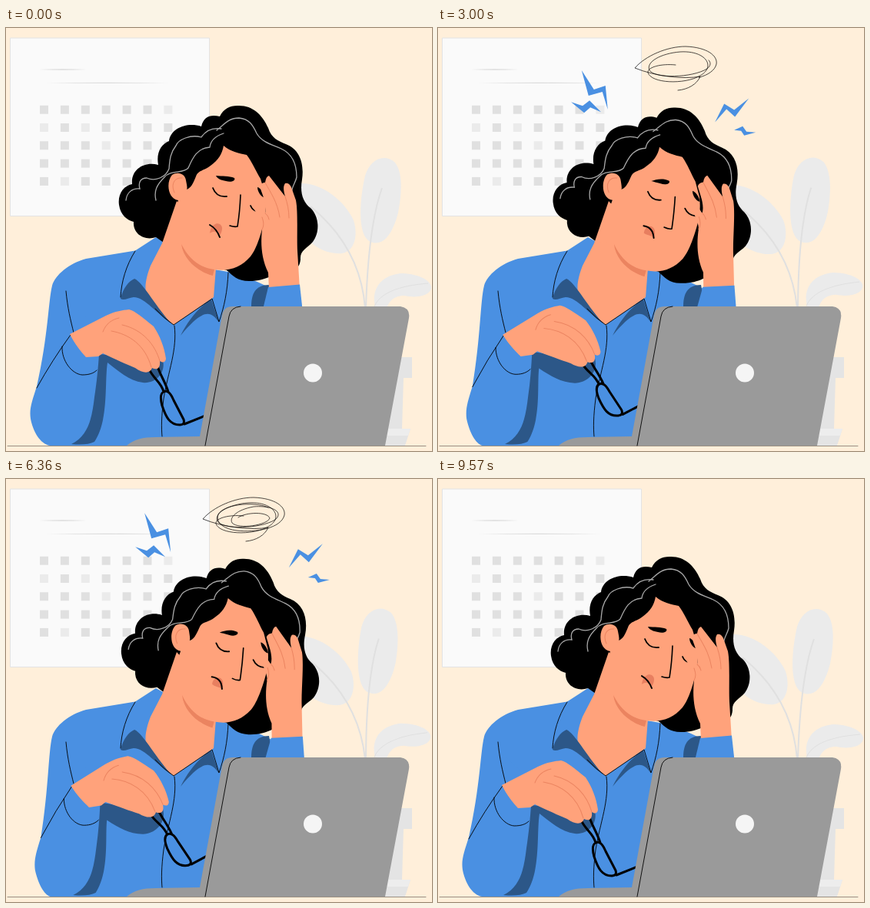
These frames come from a looping animation (554x550 px, 9.64 s). An HTML page:

```html
<!DOCTYPE html>
<html lang="en">
<head>
<meta charset="utf-8">
<title>Tired at the laptop</title>
<style>
  html, body { margin: 0; width: 100%; height: 100%; overflow: hidden; background: #ffefda; }
  svg { display: block; width: 554px; height: 550px; }
  .line { fill: none; stroke: #000; stroke-linecap: round; stroke-linejoin: round; }
  .thin { stroke-width: .9; }
  .blue { fill: #4a90e2; }
  .navy { fill: #2c5788; }
  .skin { fill: #ffa27b; }
  .crease { fill: none; stroke: #eb8460; stroke-width: 1; stroke-linecap: round; }
  .strand { fill: none; stroke: #a8a8a8; stroke-width: 1.3; stroke-linecap: round; }
  .leaf { fill: #ebebeb; }
  .stem { fill: none; stroke: #e0e0e0; stroke-width: 2; }
</style>
</head>
<body>
<svg viewBox="0 0 554 550">
  <g id="calendar">
    <path d="M5.500 13H264.500V244.500H5.500Z" fill="#fafafa" stroke="#e3e3e3"/>
    <path d="M43 54Q74 52.500 105 54Q74 55.500 43 54ZM52 71.300Q132 70 212 71.300Q132 72.600 52 71.300Z" fill="#dcdcdc"/>
  </g>

  <g id="plant">
    <path class="leaf" d="M383 202C410 201 440 224 452 250C458 268 454 290 437 293C415 295 385 280 383 250Z"/>
    <path class="leaf" d="M474 278C456 270 460 222 467 192C473 171 492 162 506 175C516 188 515 214 510 240C503 268 490 285 474 278Z"/>
    <path class="leaf" d="M480 362C475 340 487 321 515 319C540 320 554 330 553 338C551 350 530 351 518 348C505 348 499 354 495 364Z"/>
    <path class="stem" d="M467 364C463 312 440 268 396 232M468 364C470 300 476 244 489 208"/>
    <path class="stem" style="stroke-width:1" d="M479 362C486 345 510 335 549 332"/>
  </g>
  <path d="M508 428H528V455H517L515 521H526L519 543H490Z" fill="#e4e4e4"/>
  <path d="M497 521H526L523 530H495Z" fill="#ededed"/>

  <g id="bolts" class="blue">
    <path d="M180 44L196 69L211 64L214 95L207 72L189 77Z"/>
    <path d="M168 88L183 93L192 86L207 101L193 95L185 102Z"/>
    <path d="M412 84L394 108L383 98L368 115L380 91L393 99Z"/>
    <path d="M393 128L404 123L409 130L421 131L406 135L402 129Z"/>
  </g>
  <g id="scribble" class="line" stroke-width=".7">
    <path pathLength="1" d="M312 81C325 80 337 73 341 63C320 67 283 63 256 52C270 36 298 24 322 24C350 25 364 36 362 47C358 64 325 70 300 67C285 65 272 58 276 46C282 34 320 28 341 37"/>
    <path pathLength="1" d="M309 48C290 46 272 51 273 58C277 72 320 74 341 62C362 50 348 29 315 31C290 33 270 44 275 55C282 66 330 65 350 53C362 43 346 34 322 36C300 40 290 50 294 57C302 66 340 60 343 51C340 42 312 43 302 50"/>
  </g>

  <path class="blue" d="M60 335C64 321 82 306 104 300L168 289.500L195 272L271 314L289 317C305 322 325 328 341 337L360 345V543H62Z"/>
  <path class="blue" id="sleeve"/>
  <g class="head">
    <path d="M301 101C320 100 333 112 341 130C345 143 354 147 364 151C382 158 388 176 385 197C382 214 386 226 396 234C408 246 408 266 399 278C391 287 382 289 383 301C382 312 375 318 362 314C350 318 341 329 316 329C301 329 295 322 287 315L276 312L205 279L195 272C180 277 165 268 166 252C158 250 149 244 147 230C145 216 153 205 164 203C162 184 180 173 198 178C195 162 202 151 212 147C214 130 236 122 254 128C257 115 266 112 278 115C283 105 291 101 301 101Z"/>
  </g>

  <path class="skin" d="M222 225L203 280L188 309C181 327 179 342 185 352C192 366 206 378 218 386L270 350L273 312L280 290Z"/>
  <path class="navy" d="M149 352C152 338 160 329 167 326C178 330 197 366 216 385C196 372 181 350 166 350C159 351 153 355 149 352ZM227 400C237 379 253 361 267 353L277 383C266 366 255 366 227 400Z"/>
  <path class="navy" d="M319 362C319 346 324 334 342 334L347 362Z"/>
  <path class="navy" id="shade"/>
  <path class="line thin" d="M168 290C156 309 150 330 149 350M194 365Q205 377 218 386L268 352L277 382C284 362 288 342 289 318M219 387C223 418 211 446 205 482C202 505 202 520 203 531M78 342C80 364 84 380 88 396"/>
  <path class="line thin" id="folds"/>

  <g class="head">
    <path class="skin" d="M283 153C292 161 304 163 313 165C320 174 325 186 331 196L337 216Q340 236 335 254C333 262 327 286 318 297C306 311 290 317 271 314C250 306 235 294 228 281L206 279L224 224C210 222 208 200 216 191C224 186 233 190 234 198C236 208 236 210 234 210C240 209 243 203 247 193C250 184 258 186 266 179C276 172 281 164 283 153Z"/>
    <path d="M228 281C238 301 253 312 271 314L269 322C250 317 231 302 228 281Z" fill="#eb8460"/>
    <path class="crease" d="M229 195C219 194 214 203 219 214"/>
    <path class="strand" d="M274 133C285 124 290 117 303 117C316 118 321 126 326 137C333 149 347 152 358 157C371 163 378 174 378 194C376 203 370 207 371 220C372 226 374 230 376 234M283 137C274 140 266 146 265 155C249 156 243 168 237 182C230 190 214 184 206 194C196 204 192 212 195 224M280 131C268 129 260 133 254 142C240 138 224 145 221 153C214 162 213 170 212 183C208 194 194 200 183 195C174 195 172 202 174 209C164 208 157 214 156 224"/>
    <path class="line" stroke-width="1.6" id="nose"/>
    <path id="brow"/>
    <path d="M327 207C331 208 336 214 337 221C332 220 327 213 327 207Z" id="farBrow"/>
    <path class="line" stroke-width="1.8" id="eyes"/>
    <path id="lips" fill="#e87f60"/>
    <path class="line" stroke-width="2" id="mouth"/>
  </g>

  <g id="palm">
    <path class="skin" d="M342 340L341 318C332 300 331 280 333 262C333 252 325 241 320 230Q323 225 328 229L337 241C340 230 333 216 330 206Q332 201 337 201Q338 193 342 192L363 219C361 212 360 206 363 202Q368 201 371 207L377 224C380 240 378 270 379 290L382 340Z"/>
    <path class="crease" d="M337 201C344 214 353 226 356 246M363 219C366 228 368 237 368 247M337 241C341 244 341 246 342 249M333 262C336 256 335 252 333 246"/>
    <path class="blue" d="M333 370L341 337L382 333.500L386 370Z"/>
  </g>

  <g id="glasses" class="line" stroke-width="3">
    <path d="M205 473C211 470 215 477 218 484L231 509Q233 516 226 516C213 516 208 506 203 491Q199 476 205 473ZM186 443C191 456 202 460 205 473M197 440C201 452 207 460 211 473M232 515L262 503"/>
  </g>
  <g id="fingers">
    <path class="skin" d="M83 398L130 374C143 368 151 367 160 366C168 368 177 376 192 388C200 400 206 415 208 430C207 436 203 435 200 433C201 443 196 445 190 442C187 450 178 449 168 442C156 437 143 431 126 423L120 427L104 428C97 420 90 412 83 398Z"/>
    <path class="crease" d="M126 395C130 384 138 379 147 377M137 394C160 398 181 412 189 441M151 386C178 392 194 412 200 433"/>
  </g>

  <path d="M157 543C166 535 178 532 195 532L252 531L281 373Q283 362 295 362H513Q526 364 524 377L493 543Z" fill="#9a9a9a"/>
  <path class="line thin" d="M259 543L290 375Q292 363 305 362"/>
  <circle cx="399" cy="448.500" r="12" fill="#f5f5f5"/>
  <path class="line" stroke-width=".5" opacity=".8" d="M2 543.500H546"/>
</svg>
<script>
const LOOP = 9640;
const $ = id => document.getElementById(id);
const clamp = v => Math.max(0, Math.min(1, v));
const ramp = (t, from, to) => clamp((t - from) / (to - from));
const set = (el, name, value) => el.setAttribute(name, value);

// Blend two paths that share the same structure.
const number = /-?\d+(\.\d+)?/g;
const blend = (a, b, k) => {
  const ends = b.match(number);
  let i = 0;
  return a.replace(number, v => +v + (ends[i++] - v) * k);
};

const morphs = {
  sleeve: ['M60 335C55 355 55 400 40 466C34 485 30 495 32 508C35 525 45 541 57 543L130 543L130 400Z',
           'M60 335C55 355 56 400 47 466C41 485 38 495 39.5 508C43 525 51 541 58 543L130 543L130 400Z'],
  folds: ['M40 468Q60 432 84 399M73 414C72 433 86 450 99 451C108 451 114 449 118 445',
          'M47 466Q66 430 86 400M76 416C76 434 89 450 102 450C111 450 117 447 121 443'],
  shade: ['M121 424C140 424 170 438 204 432C208 448 195 463 178 461C160 459 145 445 132 435C128 460 134 510 115 538Q105 543 85 541C108 530 112 505 115 480C118 460 120 440 121 424Z',
          'M123 420C140 420 172 434 204 428C209 444 197 460 178 462C160 462 147 456 131 446C129 465 135 510 117 538Q107 543 88 541C111 530 115 505 118 480C121 460 122 440 123 420Z'],
  brow: ['M273 192C281 193 290 192 297 195C299 199 292 201 286 199C280 198 275 196 273 192Z',
         'M274 200C279 196 288 193 297 197C299 201 292 203 286 201C281 200 277 199 274 200Z'],
  eyes: ['M269 208C272 216 278 220 287 219M318 231Q321 238 328 239',
         'M270 213C273 220 279 224 287 223M319 232Q324 242 336 242'],
  nose: ['M305 217Q304 240 301 258Q297 259 291 257', 'M305.5 217Q305 240 303 259Q299 260 293 257'],
  lips: ['M265 267C266 257 273 252 278 255C283 258 281 265 278 270C273 263 269 264 265 267Z',
         'M267 265C267 259 273 256 277 258C281 261 281 266 280 271C275 270 270 270 267 265Z'],
  mouth: ['M265 256Q274 261 278 272', 'M266 256Q280 256 280 271']
};

// How far each bolt starts from its resting place.
const boltStarts = [[32, 52], [24, 39], [-37, 35], [-37, 23]];

const pale = ['0,6', '1,0', '1,2', '2,3', '4,1'];
let squares = '';
for (let row = 0; row < 5; row++)
  for (let col = 0; col < 7; col++)
    squares += `<rect x="${44 + col * 26.9}" y="${100.7 + row * 23.3}" width="11" height="11" fill="${
      pale.includes(row + ',' + col) ? '#ebebeb' : '#e0e0e0'}"/>`;
$('calendar').insertAdjacentHTML('beforeend', squares);

const heads = document.querySelectorAll('.head');
const bolts = [...$('bolts').children];
const strokes = [...$('scribble').children];

function draw(now) {
  const t = now % LOOP;
  const sway = (1 - Math.cos(2 * Math.PI * t / LOOP)) / 2;

  for (const id in morphs) set($(id), 'd', blend(...morphs[id], sway));
  heads.forEach(el => set(el, 'transform', `rotate(${2.75 * sway} 230 309)`));
  set($('palm'), 'transform', `rotate(${2.8 * sway} 350 437)`);
  set($('farBrow'), 'transform', `translate(${sway} ${2 * sway})`);
  set($('fingers'), 'transform', `translate(${2 * sway} ${sway}) rotate(${-6.6 * sway} 84 399)`);
  set($('glasses'), 'transform', `translate(${6 * sway} ${-14 * sway}) rotate(${-8.5 * sway} 205 473)`);
  set($('plant'), 'transform', `rotate(${-2 * sway} 468 364)`);

  const away = (1 - ramp(t, 0, 7800)) ** 3.2;
  bolts.forEach((el, i) => set(el, 'transform', `translate(${boltStarts[i].map(d => d * away)})`));
  set($('bolts'), 'opacity', ramp(t, 0, 2200) * (1 - ramp(t, 7230, 9570)));

  const drawn = ramp(t, 1100, 4000);
  strokes.forEach(el => {
    set(el, 'stroke-dasharray', '1 1');
    set(el, 'stroke-dashoffset', 1 - drawn);
  });
  set($('scribble'), 'opacity', drawn ? 1 - ramp(t, 8450, 9570) : 0);
}

const start = performance.now();
(function tick() {
  draw(performance.now() - start);
  requestAnimationFrame(tick);
})();
</script>
</body>
</html>
```
